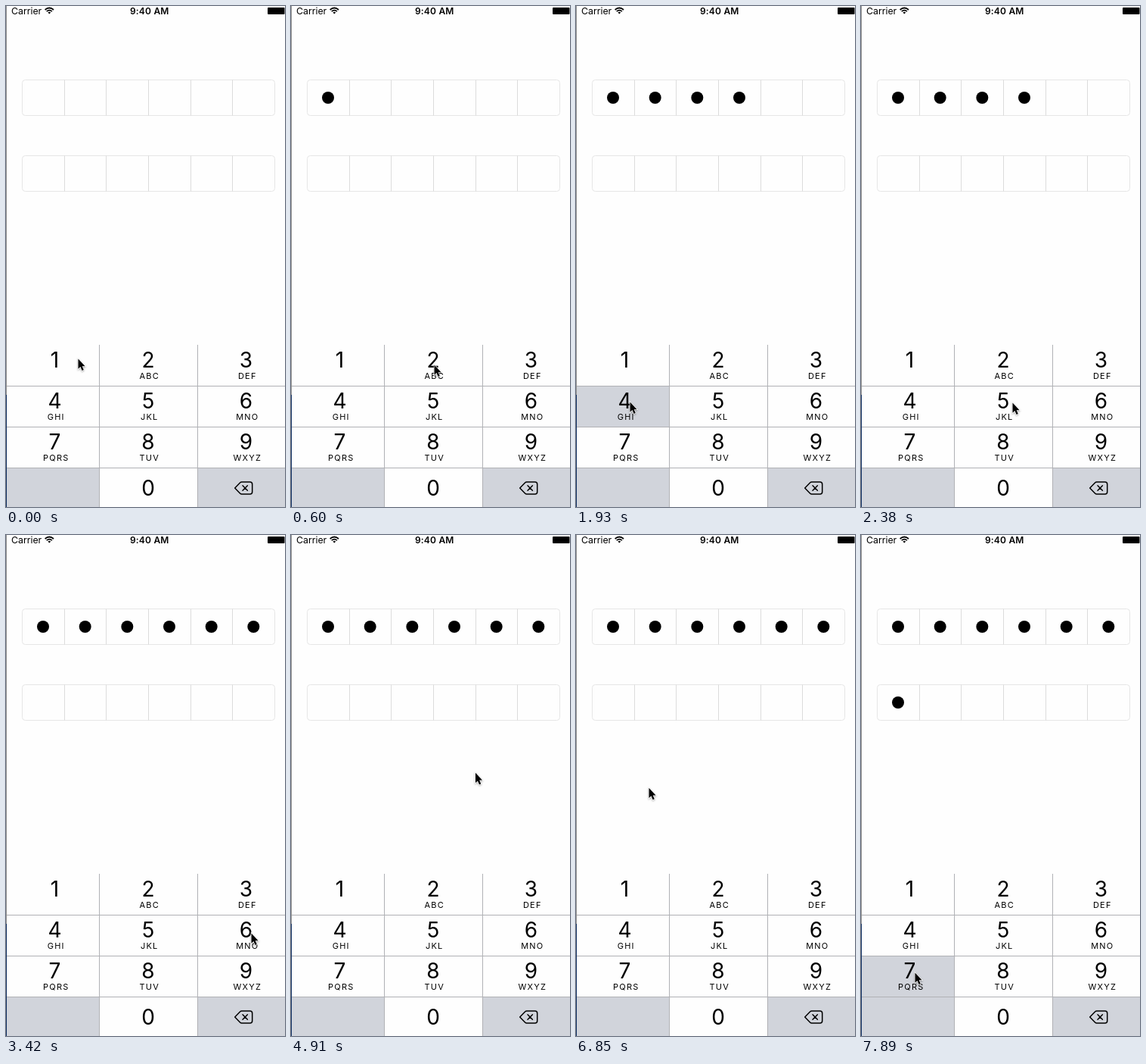
Write an HTML page that moves like this. It is 369x661 px and loops after 8 s.

```html
<!DOCTYPE html>
<html lang="en">
<head>
<meta charset="utf-8">
<title>Passcode entry</title>
<style>
  html, body { margin: 0; width: 100%; height: 100%; overflow: hidden; background: #fefefe; }
  svg { display: block; font-family: Inter, Roboto, sans-serif; }
  .digit { font-size: 28px; text-anchor: middle; }
  .letters { font-size: 11px; letter-spacing: 1.2px; text-anchor: middle; }
  .line { fill: none; stroke: #b0b1b5; }
  .field { fill: none; stroke: #e6e6e6; }
  .divider { stroke: #dcdcdc; }
  .icon { fill: none; stroke: #000; stroke-width: 1.5; stroke-linejoin: round; stroke-linecap: round; }
</style>
</head>
<body>
<svg width="369" height="661" viewBox="0 0 369 661">
  <rect width="369" height="661" fill="#fefefe"/>

  <text x="7" y="11" font-size="12.3">Carrier</text>
  <path d="M51.6 5Q57.3 0 63 5M53.7 7.2Q57.3 4 60.9 7.2" fill="none" stroke="#000" stroke-width="1.7"/>
  <path d="M55.4 8.5Q57.3 7 59.2 8.5L57.3 10.6Z"/>
  <text x="189.8" y="11" font-size="12" font-weight="600" letter-spacing=".2" text-anchor="middle">9:40 AM</text>
  <rect x="346" y="2" width="22.5" height="9" rx="1"/>

  <g id="fields"></g>

  <g id="keyboard">
    <rect x="1" y="447" width="368" height="214" fill="#fefefe"/>
    <path d="M1 609H124V661H1ZM254 609H369V661H254Z" fill="#d1d4db"/>
    <rect id="held" height="54" fill="#d1d4db"/>
    <path class="line" d="M1 501.5H369M1 555.5H369M1 609.5H369M123.5 447V661M253.5 447V661"/>
    <g id="labels"></g>
    <path class="icon" d="M302.7 636L309.5 629Q310.4 628.1 312 628.1H322.7Q325.7 628.1 325.7 631.1V641Q325.7 644 322.7 644H312Q310.4 644 309.5 643ZM313 632.8l6.4 6.4m0-6.4l-6.4 6.4"/>
  </g>

  <rect width="1" height="661" fill="#8c8c8c"/>
  <rect y="513" width="1" height="148" fill="#0b2b5e"/>

  <path id="cursor" d="M.5.5V13.8L3.4 11.1L5.6 16L7.8 15L5.7 10.3H9.6Z" stroke="#fff" stroke-width="1.4" paint-order="stroke" style="filter:drop-shadow(0 1px 1px #0005)"/>
</svg>
<script>
const LOOP = 8000, STEP = 148.9;
const FOCUS = 43;                  // step at which the second field takes over
const KEY_TOP = 447, ROW = 54;
const colEdges = [1, 124, 254, 369], colCenters = [64.5, 188, 317.5];
const letters = ['', 'ABC', 'DEF', 'GHI', 'JKL', 'MNO', 'PQRS', 'TUV', 'WXYZ'];

// Pointer stops, in steps; a press adds a dot, and a key is lit for one step
const stops = [
  { x: 95, y: 465, leave: 0, arrive: 0, press: 1, key: 1 },
  { x: 189, y: 473, leave: 2, arrive: 4, press: 5, key: 2 },
  { x: 315, y: 475, leave: 6, arrive: 8, press: 9, key: 3 },
  { x: 71, y: 522, leave: 10, arrive: 12, press: 13, key: 4 },
  { x: 200, y: 523, leave: 14, arrive: 16, press: 17, key: 5 },
  { x: 324, y: 525, leave: 18, arrive: 21, press: 23 },
  { x: 98, y: 213, leave: 30.3, arrive: 37 },
  { x: 71, y: 577, leave: 45, arrive: 51, press: 53, key: 7 }
];

const $ = id => document.getElementById(id);
const svgList = (n, draw) => Array.from({ length: n }, (_, i) => draw(i)).join('');
const lerp = (a, b, k) => a + (b - a) * k;

const presses = stops.map(s => s.press).filter(Boolean);
const fieldDots = [presses.filter(p => p < FOCUS), presses.filter(p => p > FOCUS)];

$('fields').innerHTML = fieldDots.map((steps, f) => {
  const y = 97.5 + 100 * f, cell = 334 / 6;
  return `<rect class="field" x="21.5" y="${y}" width="334" height="47" rx="4"/>` +
    svgList(5, i => `<path class="divider" d="M${Math.floor(21.5 + cell * (i + 1)) + .5} ${y}v47"/>`) +
    svgList(steps.length, i =>
      `<circle data-step="${steps[i]}" cx="${49 + cell * i}" cy="${y + 23.5}" r="8"/>`);
}).join('');

$('labels').innerHTML = svgList(9, i => {
  const x = colCenters[i % 3], y = KEY_TOP + 30 + ROW * Math.floor(i / 3);
  return `<text class="digit" x="${x}" y="${y}">${i + 1}</text>` +
    `<text class="letters" x="${x + 1.8}" y="${y + 15}">${letters[i]}</text>`;
}) + '<text class="digit" x="188" y="646">0</text>';

const dots = [...document.querySelectorAll('circle')];

// Sideways motion eases in and out, vertical motion only eases out
function pointerAt(step) {
  const i = stops.findLastIndex(s => s.leave <= step);
  const to = stops[i], from = stops[i - 1] ?? to;
  const k = Math.min(1, (step - to.leave) / (to.arrive - to.leave || 1));
  return [lerp(from.x, to.x, k * k * (3 - 2 * k)), lerp(from.y, to.y, 1 - (1 - k) ** 2.2)];
}

function draw(time) {
  const step = Math.floor((time % LOOP + 10) / STEP);

  for (const d of dots) d.style.display = step >= d.dataset.step ? '' : 'none';

  const key = stops.find(s => s.press === step)?.key, held = $('held');
  held.style.display = key ? '' : 'none';
  if (key) {
    const col = (key - 1) % 3;
    held.setAttribute('x', colEdges[col]);
    held.setAttribute('width', colEdges[col + 1] - colEdges[col]);
    held.setAttribute('y', KEY_TOP + ROW * Math.floor((key - 1) / 3));
  }

  // The keyboard springs back up after the focus change
  const drop = step < FOCUS ? 0 : Math.round(33 * Math.exp(2 * (FOCUS - step)));
  $('keyboard').setAttribute('transform', `translate(0 ${drop})`);
  $('cursor').setAttribute('transform', `translate(${pointerAt(step)})`);
}

let start;
function tick(now) {
  start ??= now;
  draw(now - start);
  requestAnimationFrame(tick);
}
draw(0);
requestAnimationFrame(tick);
</script>
</body>
</html>
```
